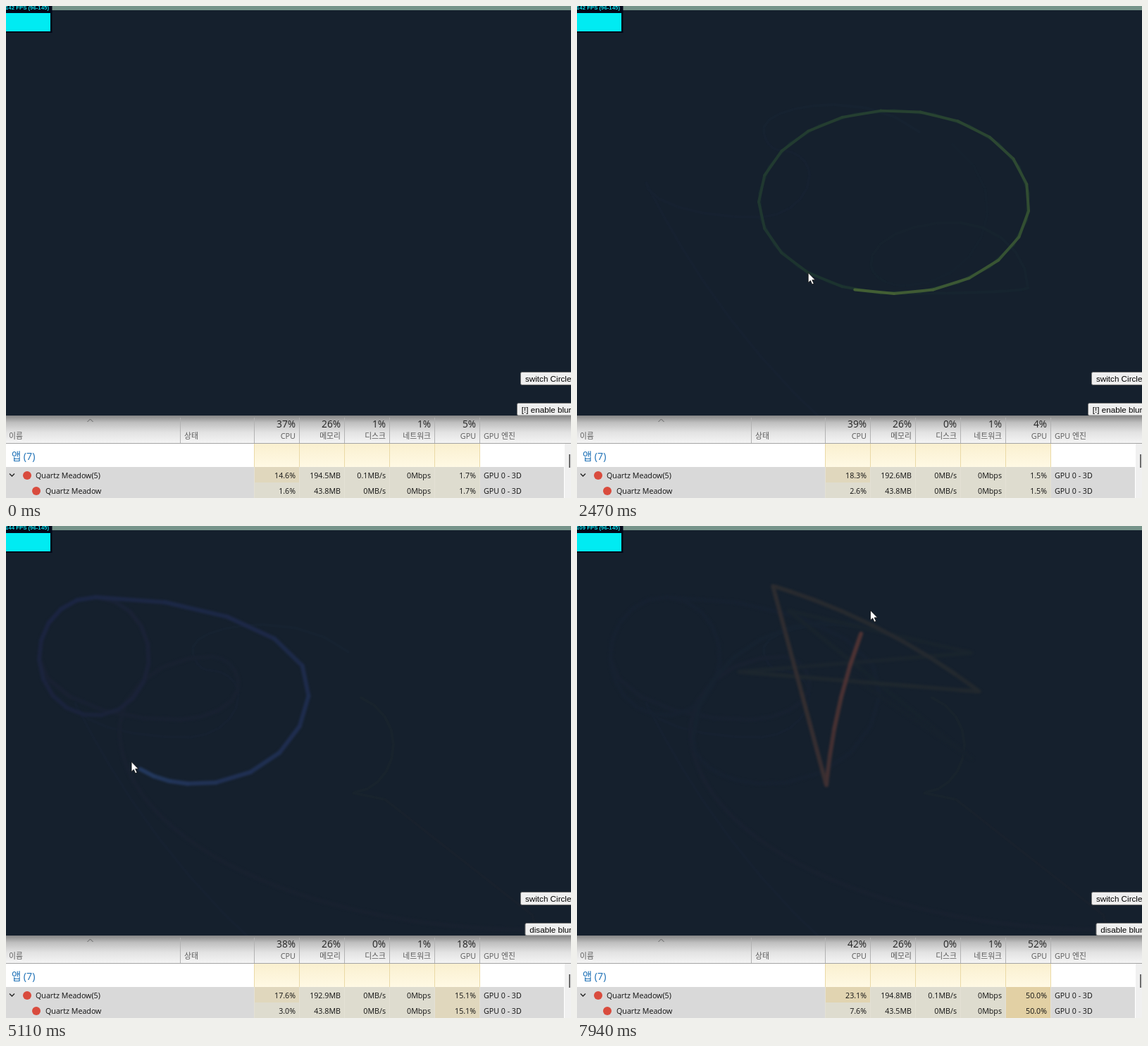
An HTML page for the animation above (8 s loop, 802x698 px).

```html
<!DOCTYPE html>
<html lang="ko">
<head>
<meta charset="utf-8">
<title>Pointer trail</title>
<style>
html, body { margin: 0; width: 100%; height: 100%; overflow: hidden; background: #15202d; }
svg { display: block; width: 802px; height: 698px; }
text { font-family: "Open Sans", "Noto Sans CJK KR", "Noto Sans CJK", sans-serif; white-space: pre; }
.ui { font-family: "Liberation Sans", Arial, sans-serif; font-size: 11.67px; fill: #000; }
.btn { fill: #efefef; stroke: #767676; }
.pct { font-size: 13.7px; fill: #222; text-anchor: end; }
.head { font-size: 10.8px; fill: #5c5c5c; }
.end { text-anchor: end; }
.cell { font-size: 10.7px; fill: #111; }
.sharp { stroke-width: 4; }
.soft { stroke-width: 6; filter: blur(1.8px); }
</style>
</head>
<body>
<svg viewBox="0 0 802 698">
  <defs>
    <linearGradient id="shade" x2="0" y2="1">
      <stop offset="0" stop-color="#858585"/><stop offset=".25" stop-color="#bfbfbf"/>
      <stop offset=".6" stop-color="#e3e3e3"/><stop offset="1" stop-color="#f5f5f5"/>
    </linearGradient>
    <linearGradient id="cream" x2="0" y2="1">
      <stop offset="0" stop-color="#faf0d0"/><stop offset="1" stop-color="#fff9e4"/>
    </linearGradient>
    <clipPath id="view"><rect y="6" width="802" height="575"/></clipPath>
  </defs>
  <rect width="802" height="698" fill="#15202d"/>
  <g clip-path="url(#view)" fill="none" stroke-linecap="round">
    <g id="sharp" class="sharp"/>
    <g id="soft" class="soft"/>
  </g>
  <rect width="802" height="6" fill="#76948a"/>
  <rect width="65.5" height="38" fill="#020618"/>
  <rect y="10" width="63" height="26" fill="#00ebf2"/>
  <text id="fps" class="ui" x="-1" y="4.6" style="font-size:7.8px;font-weight:bold;fill:#0ce4ee"></text>
  <rect class="btn" x="730.5" y="519.5" width="90" height="18" rx="2"/>
  <text class="ui" x="737" y="532.5">switch Circle</text>
  <rect id="blurBox" class="btn" y="563.5" width="90" height="17.5" rx="2"/>
  <text id="blurText" class="ui" y="576.5"></text>
  <g id="table"></g>
  <circle id="press" cx="752.5" cy="573.5" r="10.5" fill="#f7e035" opacity=".75"/>
  <path id="cursor" d="M0 0V14L3.2 11.1 5.6 16.4 8 15.3 5.6 10.2H10Z" fill="#fff" stroke="#111" stroke-width=".8"/>
</svg>
<script>
const LOOP = 8000, PRESS = 3400, BLUR_ON = 3560;
const $ = id => document.getElementById(id);

function add(parent, tag, attrs, text) {
  const el = document.createElementNS("http://www.w3.org/2000/svg", tag);
  for (const k in attrs) el.setAttribute(k, attrs[k]);
  if (text) el.textContent = text;
  parent.appendChild(el);
  return el;
}

// ---- Pointer path: quarter arcs between extremes, and eased straight strokes ----
const legs = [];
let clock = 400, at = [520, 720];

const rise = u => Math.sin(u * Math.PI / 2), dip = u => 1 - Math.cos(u * Math.PI / 2);
const steep = u => [dip(u), rise(u)];
const flat = u => [rise(u), dip(u)];
const eased = u => Array(2).fill(u * u * (3 - 2 * u));

function leg(ms, to, ease, bow = 0) {
  legs.push({ t: clock, ms, from: at, to, ease, bow });
  clock += ms;
  at = to;
}
function curl(ms, ease, points) {
  points.forEach((p, i) => leg(ms, p, (ease === flat) === (i % 2 === 0) ? flat : steep));
}
function zig(ms, ...points) {
  points.forEach(([x, y, bow]) => leg(ms, [x, y], eased, bow));
}
// extremes of an ellipse in clockwise order; 0 right, 1 bottom, 2 left, 3 top
function ring(cx, cy, rx, ry, first, n) {
  return Array.from({ length: n }, (_, i) => {
    const a = (first + i) * Math.PI / 2;
    return [cx + rx * Math.cos(a), cy + ry * Math.sin(a)];
  });
}

zig(200, [98, 250, -0.07]);
curl(80, steep, [[255, 300], [330, 240], [290, 205], [265, 175], [365, 140],
  [521, 245], [357, 400], [235, 290], [412, 160], [583, 285], [465, 397], [417, 365], [534, 307],
  [640, 400], ...ring(450, 278, 192, 130, 1, 10), [475, 238], [550, 310], [490, 378]]);
zig(60, [538, 388]);
clock = 3120;
zig(190, [747, 552]);
zig(80, [753, 573]);
clock = 3840;
curl(412, flat, [[161, 288]]);
curl(74, steep, [[290, 185]]);
curl(71.7, flat, [[330, 225], [240, 275], ...ring(125, 185, 78, 84, 2, 6), [430, 230], [270, 366]]);
curl(95, flat, [[165, 305], [365, 136], [491, 245], [345, 366], [200, 240], [395, 100], [546, 215], [385, 349],
  [197, 195], ...ring(420, 250, 222, 108, 3, 4)]);
zig(95, [440, 248], [510, 263], [464, 150, -0.1], [257, 322, -0.07], [588, 359, -0.02], [350, 187]);
zig(134.5, [560, 330], [300, 120], [560, 180], [230, 207]);
zig(150, [571, 235], [278, 85, 0.045], [354, 368], [445, 60, -0.05]);

function pointer(t) {
  const l = legs.filter(s => s.t <= t).pop() || legs[0];
  const u = Math.max(0, Math.min(1, (t - l.t) / l.ms)), [fx, fy] = l.ease(u);
  const dx = l.to[0] - l.from[0], dy = l.to[1] - l.from[1], bend = l.bow * 4 * fx * (1 - fx);
  return [l.from[0] + dx * fx - dy * bend, l.from[1] + dy * fy + dx * bend];
}

// ---- Trail: hue runs with time, strokes fade into the background ----
const BG = [21, 32, 45], LAG = 20, STEP = 15, FADE = 250, RESIDUE = 0.018;

const hue = t => (1013 - 0.0852 * Math.min(t, 5850) - 0.07 * Math.max(0, t - 5850)) % 360;

function tint(h) {
  return [0, 8, 4].map(n => {
    const k = (n + h / 30) % 12;
    return 255 * (0.5 - 0.25 * Math.max(-1, Math.min(k - 3, 9 - k, 1)));
  });
}

const trail = [];
for (let t = clock = legs[0].t; t < LOOP; t += STEP) {
  const [x1, y1] = pointer(t), [x2, y2] = pointer(t + STEP);
  if (Math.hypot(x2 - x1, y2 - y1) < 0.3) continue;
  const h = hue(t), soft = t >= BLUR_ON;
  trail.push({
    t, rgb: tint(h), peak: soft ? 0.34 : 0.42, floor: h > 205 || h < 70 ? RESIDUE : 0,
    el: add($(soft ? "soft" : "sharp"), "line", { x1, y1, x2, y2 })
  });
}

function drawTrail(now) {
  for (const s of trail) {
    const age = now - LAG - s.t;
    const a = age < STEP / 2 ? 0 : Math.max(s.floor, s.peak * Math.exp(-age / FADE));
    const show = a > 0.005;
    s.el.style.display = show ? "" : "none";
    if (show) s.el.style.stroke = `rgb(${s.rgb.map((c, i) => Math.round(BG[i] + (c - BG[i]) * a))})`;
  }
}

// ---- Process table ----
const table = $("table");
const edges = Array.from({ length: 6 }, (_, i) => 352 + 64 * i), lefts = edges.slice(0, 5);
const rect = (x, y, width, height, fill) => add(table, "rect", { x, y, width, height, fill });
const label = (cls, x, y, text) => add(table, "text", { class: cls, x, y }, text);

rect(0, 581, 802, 40, "url(#shade)");
rect(0, 621, 802, 77, "#fff");
rect(352, 621, 320, 33, "url(#cream)");
rect(0, 654, 792, 44, "#d9d9d9");
rect(793, 621, 9, 77, "#f0f0f0");
rect(799, 636, 2, 19, "#6b6b6b");
rect(0, 620, 802, 1, "#a4a4a4");

const cells = [654, 676].map(y => lefts.map(x => rect(x, y, 64, 22)));
[247, ...edges].forEach(x => rect(x, 584, 1, 36, "#b2b2b2"));
edges.forEach(x => { rect(x, 621, 1, 33, "#ead9a6"); rect(x, 654, 1, 44, "#e4e1d5"); });

add(table, "path", { d: "M115.5 590L119.5 586L123.5 590", fill: "none", stroke: "#666" });
add(table, "path", { d: "M5 663.5L8.5 667L12 663.5", fill: "none", stroke: "#222", "stroke-width": 1.3 });
label("head", 4, 613.5, "이름");
label("head", 253, 613.5, "상태");
label("head", 678, 613.5, "GPU 엔진");
["CPU", "메모리", "디스크", "네트워크", "GPU"].forEach((s, i) => label("head end", lefts[i] + 59, 613.5, s));
add(table, "text", { x: 8, y: 644, "font-size": 14.3, fill: "#1b6fb5" }, "앱 (7)");

["Quartz Meadow(5)", "Quartz Meadow"].forEach((name, i) => {
  const y = 670 + 22 * i;
  add(table, "circle", { cx: 30 + 13 * i, cy: y - 4, r: 6, fill: "#d94b3d" });
  label("cell", 42 + 14 * i, y, name);
  label("cell", 678, y, "GPU 0 - 3D");
});

const column = (cls, y) => lefts.map(x => label(cls, x + 59, y, ""));
const totals = column("pct", 597.5), rows = [column("cell end", 670), column("cell end", 692)];
const heat = v => v > 40 ? "#e2d0a4" : v > 20 ? "#e1d4b1" : v > 10 ? "#e0d7bd" : "#dedccf";

// total CPU, app CPU, child CPU, app memory, GPU
const readings = [
  [37, 14.6, 1.6, 194.5, 1.7],
  [35, 15.8, 1.1, 210.9, 1.9],
  [39, 18.3, 2.6, 192.6, 1.5],
  [38, 17.6, 3, 192.9, 15.1],
  [38, 18.8, 4.5, 195.9, 50.8],
  [41, 21.4, 6.4, 196.1, 49.8],
  [42, 23.1, 7.6, 194.8, 50]
];

function drawStats(now) {
  const sec = Math.floor((now + 770) / 1000), i = sec < 5 ? Math.ceil(sec / 2) : sec - 2;
  const [cpu, app, child, mem, gpu] = readings[i];
  const disk = i === 2 || i === 3 ? 0 : 0.1, childMem = 43.8 - 0.1 * Math.max(0, i - 3);
  $("fps").textContent = `${gpu > 40 ? 109 : 142 + 2 * (i % 2)} FPS (96-145)`;
  [cpu, 26, i < 2 ? 1 : 0, 1, Math.round(gpu * 0.985 + 2.85)].forEach((v, k) => totals[k].textContent = v + "%");
  [[app, mem, disk], [child, childMem, 0]].forEach(([c, m, d], r) => {
    [c.toFixed(1) + "%", m.toFixed(1) + "MB", d + "MB/s", "0Mbps", gpu.toFixed(1) + "%"]
      .forEach((s, k) => rows[r][k].textContent = s);
    [c, 0, 0, 0, gpu].forEach((v, k) => cells[r][k].setAttribute("fill", heat(v)));
  });
}

// ---- Clock: the screen refreshes twelve times in 810 ms ----
const FRAME = 810 / 12;
const tick = t => Math.max(0, 3420 + FRAME * Math.floor((t - 3420) / FRAME + 0.15));

function draw(now) {
  drawTrail(now);
  drawStats(now);
  const on = now >= BLUR_ON, x = on ? 737 : 725.5;
  $("blurBox").setAttribute("x", x);
  $("blurText").setAttribute("x", x + 6.3);
  $("blurText").textContent = on ? "disable blur" : "[!] enable blur";
  $("press").style.display = now >= PRESS && !on ? "" : "none";
  $("cursor").setAttribute("transform", `translate(${pointer(now)})`);
}

const start = performance.now();
let shown = -1;
function loop() {
  const now = tick((performance.now() - start) % LOOP);
  if (now !== shown) draw(shown = now);
  requestAnimationFrame(loop);
}
loop();
</script>
</body>
</html>
```
